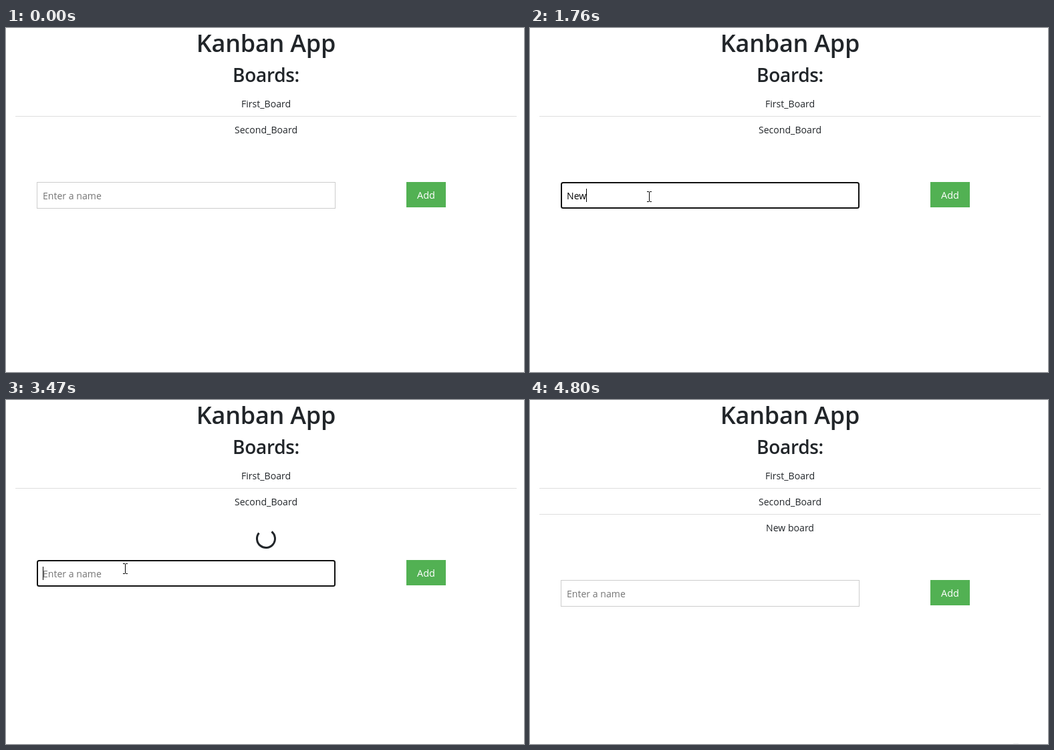
An HTML page that plays this animation: 775 px wide and 516 px high, repeating every 4.88 s.

```html
<!DOCTYPE html>
<html lang="en">
<head>
<meta charset="utf-8">
<title>Kanban App</title>
<style>
html, body { margin: 0; width: 100%; height: 100%; overflow: hidden; background: #fff; }
svg { display: block; width: 775px; height: 516px; }
text { font: 14.1px "Open Sans", "Noto Sans", sans-serif; fill: #212529; white-space: pre; }
.mid { text-anchor: middle; }
#title { font-size: 36px; font-weight: 600; letter-spacing: -.25px; }
#sub { font-size: 28px; font-weight: 600; letter-spacing: -.3px; }
.rule { fill: #dedede; }
#add { font-size: 14.5px; fill: #fff; }
#plain { fill: #fff; stroke: #ccc; }
#focus { fill: #fff; stroke: #101010; stroke-width: 2; }
#hint { fill: #757575; }
#value { fill: #000; }
</style>
</head>
<body>
<svg viewBox="0 0 775 516">
  <text id="title" class="mid" x="389" y="36">Kanban App</text>
  <text id="sub" class="mid" x="389" y="81">Boards:</text>
  <text class="mid" x="389" y="119">First_Board</text>
  <rect class="rule" x="14" y="132" width="750" height="1"/>
  <text class="mid" x="389" y="158">Second_Board</text>
  <g id="item">
    <rect class="rule" x="14" y="171" width="750" height="1"/>
    <text class="mid" x="389" y="197">New board</text>
  </g>
  <circle id="spinner" cx="389" cy="208" r="13.5" fill="none" stroke="#212529" stroke-width="3"
    pathLength="360" stroke-dasharray="270 90"/>
  <g id="form">
    <rect id="plain" x="46.5" y="231.5" width="446" height="39"/>
    <rect id="focus" x="47" y="232" width="445" height="38" rx="2.5"/>
    <text id="hint" x="55" y="257">Enter a name</text>
    <text id="value" x="55" y="257"></text>
    <rect id="caret" y="241" width="1" height="20"/>
    <rect x="599" y="231" width="59" height="38" fill="#52b153"/>
    <text id="add" class="mid" x="628.5" y="256">Add</text>
  </g>
  <path id="arrow" d="M.5 .5v16.3l3.8-3.6 3.1 6.9 2.7-1.2-3.1-6.7h4.9z" fill="#fff" stroke="#000"/>
  <path id="beam" d="M-3 -7.5h3m1 0h3M.5 -7v14M-3 7.5h3m1 0h3" fill="none" stroke="#000"/>
  <circle id="click" cx="175" cy="252" r="12" fill="#ff0" opacity=".5"/>
  <rect id="sliver" x="723" y="515" width="8" height="1" fill="#f0f0f0"/>
</svg>
<script>
const LOOP = 4880;
const WORD = "New board";
const $ = id => document.getElementById(id);

// [time, value]: each value holds until the next row
const typed = [[0, 0], [1460, 1], [1610, 2], [1760, 3], [1840, 4], [1990, 5],
  [2220, 6], [2390, 7], [2460, 8], [2690, 9], [3400, 0]];
const caretOn = [[0, 0], [750, 1], [1210, 0], [1460, 1], [3240, 0], [3400, 1],
  [3860, 0], [4400, 1], [4800, 0]];
const formShift = [[0, 0], [2920, 9], [3550, 39]];

// [time, shape, x, y]
const pointer = [
  [0, ""],
  [70, "arrow", 578, 474], [150, "arrow", 484, 431], [220, "arrow", 402, 388],
  [300, "arrow", 324, 345], [370, "arrow", 262, 309], [450, "arrow", 215, 282],
  [520, "beam", 188, 267], [600, "beam", 177, 253], [910, "beam", 178, 253],
  [3550, "arrow", 178, 252],
  [4010, "arrow", 210, 273], [4090, "arrow", 302, 336], [4160, "arrow", 405, 406],
  [4240, "arrow", 497, 460], [4320, "arrow", 572, 493], [4400, "arrow", 629, 511],
  [4480, ""]
];

const at = (table, t) => table.findLast(row => row[0] <= t);
const show = (id, on) => $(id).setAttribute("visibility", on ? "visible" : "hidden");
const within = (t, from, to) => t >= from && t < to;

function draw(t) {
  const value = WORD.slice(0, at(typed, t)[1]);
  const focused = within(t, 750, 4800);
  $("form").setAttribute("transform", `translate(0 ${at(formShift, t)[1]})`);
  show("plain", !focused);
  show("focus", focused);
  show("hint", !value);
  $("value").textContent = value;
  const width = value ? $("value").getComputedTextLength() : 0;
  $("caret").setAttribute("x", 55 + Math.round(width));
  show("caret", at(caretOn, t)[1]);

  show("item", t >= 3550);
  show("spinner", within(t, 2920, 3550));
  // one turn takes 750 ms, seen in steps
  const tick = Math.floor((t - 2920) / 78.5);
  $("spinner").setAttribute("transform", `rotate(${45 + tick * 78.5 * 0.48} 389 208)`);

  const [, shape, x, y] = at(pointer, t);
  for (const id of ["arrow", "beam"]) {
    show(id, shape === id);
    if (shape === id) $(id).setAttribute("transform", `translate(${x} ${y})`);
  }
  show("click", within(t, 680, 750));
  show("sliver", t >= 4800);
}

const start = performance.now();
function loop() {
  draw((performance.now() - start) % LOOP);
  requestAnimationFrame(loop);
}
loop();
</script>
</body>
</html>
```
